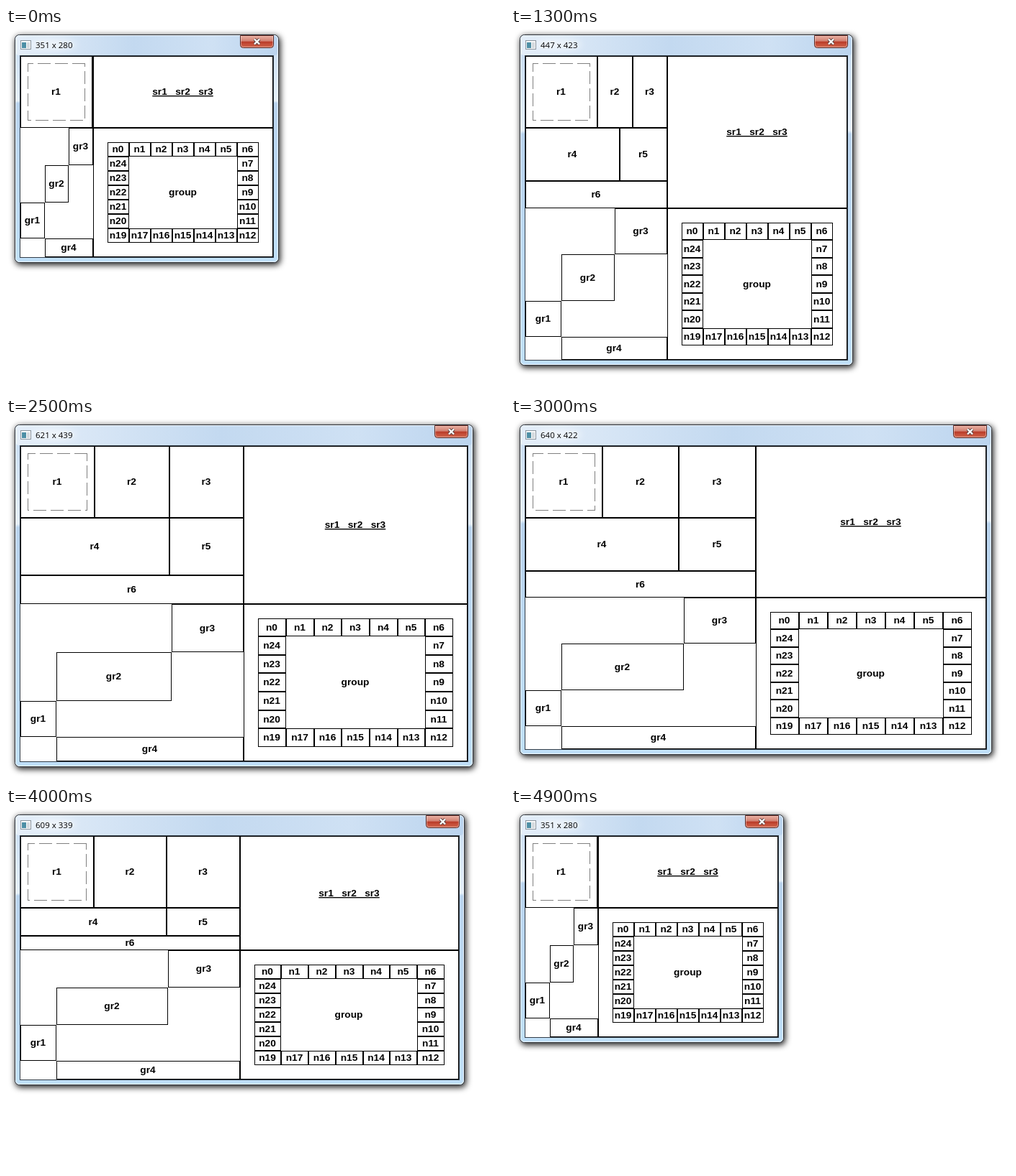
Animation, 693 px wide and 504 px high, one loop 5000 ms. Source, as an HTML page:

```html
<!DOCTYPE html>
<html lang="en">
<head>
<meta charset="utf-8">
<title>Resizable layout</title>
<style>
  html, body { margin: 0; width: 100%; height: 100%; overflow: hidden; background: #fff; }
  #stage { display: block; }
  .label { font: bold 13.7px "Liberation Sans", Arial, sans-serif; text-anchor: middle; fill: #000; }
  .underline { text-decoration: underline 1px; text-underline-offset: 2px; }
  .title { font: 11.5px "Open Sans", "Noto Sans", sans-serif; fill: #000; }
  .crisp { shape-rendering: crispEdges; }
</style>
</head>
<body>
<svg id="stage" xmlns="http://www.w3.org/2000/svg" width="693" height="504" viewBox="0 0 693 504">
  <defs>
    <filter id="blur" x="-30" y="-30" width="800" height="620" filterUnits="userSpaceOnUse">
      <feGaussianBlur stdDeviation="4"/>
    </filter>
    <linearGradient id="glass" x1="0" y1="0" x2="0" y2="1">
      <stop offset="0" stop-color="#c4daf1"/>
      <stop offset="0.29" stop-color="#e6f0fa"/>
      <stop offset="0.3" stop-color="#b9d3ed"/>
      <stop offset="1" stop-color="#bfdff8"/>
    </linearGradient>
    <linearGradient id="bar" x1="0" y1="0" x2="1" y2="0">
      <stop offset="0" stop-color="#e4eef9"/>
      <stop offset="0.45" stop-color="#c3d9f0"/>
      <stop offset="0.75" stop-color="#cfe1f4"/>
      <stop offset="1" stop-color="#bbd4ee"/>
    </linearGradient>
    <linearGradient id="red" x1="0" y1="0" x2="0" y2="1">
      <stop offset="0" stop-color="#e9b3a6"/>
      <stop offset="0.46" stop-color="#d27f70"/>
      <stop offset="0.5" stop-color="#b93a28"/>
      <stop offset="1" stop-color="#d4694f"/>
    </linearGradient>
  </defs>
  <rect id="shadow" x="13" y="11" rx="7" fill="#000" fill-opacity="0.88" filter="url(#blur)"/>
  <rect id="frame" x="12.5" y="9.5" rx="6" fill="url(#glass)" stroke="#2c3138"/>
  <rect id="titlebar" x="14" y="11" height="27" rx="4" fill="url(#bar)"/>
  <rect id="shine" x="13.5" y="10.5" rx="5" fill="none" stroke="#fff" stroke-opacity="0.75"/>
  <ellipse cx="66" cy="23" rx="32" ry="8" fill="#fff" fill-opacity="0.5" filter="url(#blur)"/>
  <g class="crisp">
    <rect x="20" y="17" width="15" height="13" fill="#8c969f"/>
    <rect x="21" y="18" width="13" height="11" fill="#f7f9fa"/>
    <rect x="22" y="20" width="6" height="8" fill="#4d8fa5"/>
    <rect x="29" y="20" width="4" height="8" fill="#d4dade"/>
  </g>
  <text id="title" class="title" x="41" y="28"></text>
  <g id="close">
    <path d="M.5 .5H46.5V13.5Q46.5 17.5 42.5 17.5H4.5Q.5 17.5 .5 13.5Z" fill="url(#red)" stroke="#5b2722"/>
    <path d="M1.5 1V13.5Q1.5 16.5 4.5 16.5H42.5Q45.5 16.5 45.5 13.5V1" fill="none" stroke="#fff" stroke-opacity="0.4"/>
    <path d="M20 5.5L27 12.5M27 5.5L20 12.5" stroke="#5c4444" stroke-width="4.4"/>
    <path d="M20 5.5L27 12.5M27 5.5L20 12.5" stroke="#fff" stroke-width="2.4"/>
  </g>
  <rect id="edge" class="crisp" x="19" y="38" fill="#333d48"/>
  <rect id="client" class="crisp" x="20" y="39" fill="#fff"/>
  <g id="cells" class="crisp"></g>
  <path id="dashes" class="crisp" fill="none" stroke="#808080" stroke-dasharray="18 6"/>
</svg>
<script>
const NS = "http://www.w3.org/2000/svg";
const LOOP = 5000, STEP = 100, X0 = 20, Y0 = 39;

// Client size along the drag: time, width, height
const drag = [
  [0, 351, 280], [300, 351, 317], [500, 359, 342], [600, 366, 354],
  [1200, 432, 419], [1300, 447, 423], [1800, 537, 437], [2400, 617, 440],
  [2500, 621, 439], [3000, 640, 422], [3400, 647, 399], [3600, 645, 386],
  [4000, 609, 339], [4200, 568, 323], [4800, 386, 281], [4900, 351, 280]
];

const byId = id => document.getElementById(id);

function set(node, attrs) {
  for (const key in attrs) node.setAttribute(key, attrs[key]);
  return node;
}

function add(parent, tag, attrs) {
  return parent.appendChild(set(document.createElementNS(NS, tag), attrs));
}

function slope(i, k) {
  const a = drag[Math.max(0, i - 1)], b = drag[Math.min(drag.length - 1, i + 1)];
  return (b[k] - a[k]) / (b[0] - a[0]);
}

// Cubic Hermite through the drag points
function sizeAt(t, k) {
  let i = 0;
  while (i < drag.length - 2 && drag[i + 1][0] <= t) i++;
  const a = drag[i], b = drag[i + 1], span = b[0] - a[0];
  const u = Math.min(1, (t - a[0]) / span), v = 1 - u;
  const value = v * v * (1 + 2 * u) * a[k] + u * u * (3 - 2 * u) * b[k]
    + span * u * v * (v * slope(i, k) - u * slope(i + 1, k));
  return Math.max(drag[0][k], Math.round(value));
}

const cells = {};

function makeCell(name) {
  const box = add(byId("cells"), "svg", { overflow: "hidden" });
  const line = add(box, "rect", { fill: "#000" });
  const fill = add(box, "rect", { x: 1, y: 1, fill: "#fff" });
  const text = add(box, "text", { class: "label" });
  text.textContent = name;
  return cells[name] = { box, line, fill, text };
}

// Places a cell by its edges, relative to the client area
function place(name, left, top, right, bottom) {
  const { box, line, fill, text } = cells[name] || makeCell(name);
  const x = Math.round(left), y = Math.round(top);
  const width = Math.round(right) - x, height = Math.round(bottom) - y;
  const shown = width > 0 && height > 0;
  box.style.display = shown ? "" : "none";
  if (!shown) return;
  set(box, { x: X0 + x, y: Y0 + y, width, height });
  set(line, { width, height });
  set(fill, { width: Math.max(0, width - 2), height: Math.max(0, height - 2) });
  set(text, { x: width / 2 - 0.5, y: Math.round(height / 2) + 4 });
}

function drawFrame(w, h) {
  set(byId("shadow"), { width: w + 17, height: h + 39 });
  set(byId("frame"), { width: w + 15, height: h + 37 });
  set(byId("titlebar"), { width: w + 12 });
  set(byId("shine"), { width: w + 13, height: h + 35 });
  set(byId("edge"), { width: w + 2, height: h + 2 });
  set(byId("client"), { width: w, height: h });
  set(byId("close"), { transform: `translate(${w - 26} 10)` });
  byId("title").textContent = `${w} x ${h}`;
}

function drawRows(w, h) {
  const r1 = Math.max(100, w / 3), r2 = (r1 + w) / 2;
  const mid = 100 + (h - 100) * 2 / 3;
  place("r1", 0, 0, r1, 100);
  place("r2", r1, 0, r2, 100);
  place("r3", r2, 0, w, 100);
  place("r4", 0, 100, w * 2 / 3, mid);
  place("r5", w * 2 / 3, 100, w, mid);
  place("r6", 0, mid, w, h);
  const left = X0 + 10.5, top = Y0 + 10.5, right = X0 + Math.round(r1) - 10.5, bottom = Y0 + 89.5;
  set(byId("dashes"), { d: `M${right} ${top}H${left}V${bottom}H${right}V${top}` });
}

function drawStairs(w, top, h) {
  const a = Math.min(50, w / 3), b = w - Math.min(100, (w - a) / 2);
  const rise = (h - top - 50) * 0.4;
  const y1 = top + rise, y2 = y1 + rise, y3 = y2 + 50;
  place("gr3", b, top, w, y1);
  place("gr2", a, y1, b, y2);
  place("gr1", 0, y2, a, y3);
  place("gr4", a, y3, w, h);
}

// A ring of cells around the central group, in a 7 by 7 grid
function drawRing(left, top, right, bottom) {
  const cw = (right - left) / 7, ch = (bottom - top) / 7;
  const cell = (n, col, row) =>
    place("n" + n, left + col * cw, top + row * ch, left + (col + 1) * cw, top + (row + 1) * ch);
  place("group", left + cw, top + ch, right - cw, bottom - ch);
  cells.group.line.setAttribute("fill", "#fff");
  for (let i = 0; i < 7; i++) cell(i, i, 0);
  for (let i = 1; i < 7; i++) cell(6 + i, 6, i);
  for (let i = 1; i < 6; i++) cell(12 + i, 6 - i, 6);
  for (let i = 0; i < 6; i++) cell(19 + i, 0, 6 - i);
}

const links = "sr1   sr2   sr3".replace(/ /g, "\u00a0");
const panel = "";

function draw(t) {
  const time = Math.floor(t / STEP) * STEP;
  const w = sizeAt(time, 1), h = sizeAt(time, 2);
  // The middle column trails the drag, which decides how half pixels round
  const lag = 1e-4 * Math.sign(w - sizeAt(Math.max(0, time - STEP), 1));
  const left = Math.min(w - 250, w / 2 - lag);
  const top = Math.min(h - 180, h / 2);
  drawFrame(w, h);
  drawRows(left, top);
  place(links, left, 0, w, top);
  cells[links].text.classList.add("underline");
  drawStairs(left, top, h);
  place(panel, left, top, w, h);
  drawRing(left + 20, top + 20, w - 20, h - 20);
}

const start = performance.now();

function tick() {
  draw((performance.now() - start) % LOOP);
  requestAnimationFrame(tick);
}

draw(0);
requestAnimationFrame(tick);
</script>
</body>
</html>
```
